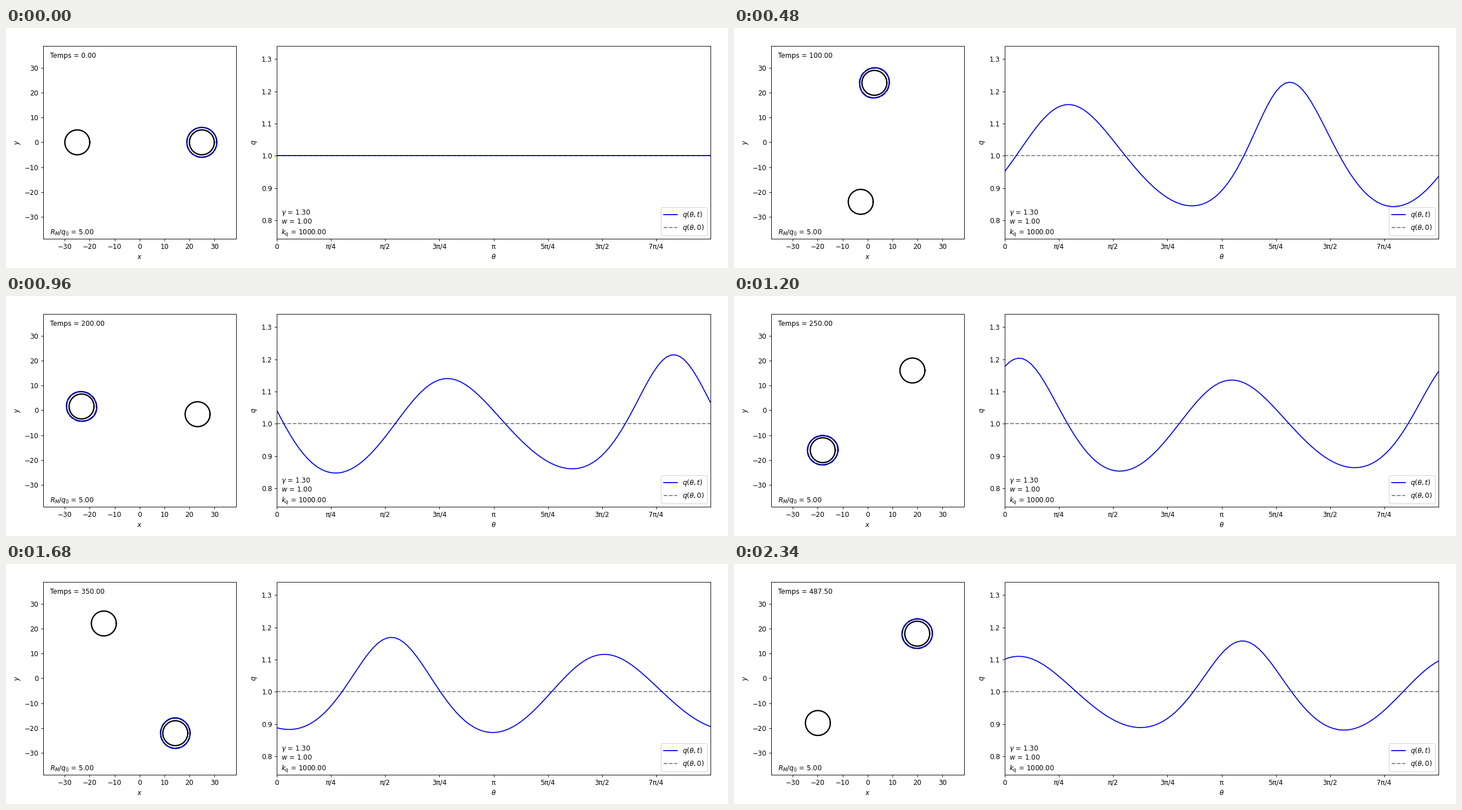
Animation of 1280x427 px, one loop 2400 ms. Source, as a matplotlib script:

```python
import numpy as np
import matplotlib.pyplot as plt
from matplotlib.animation import FuncAnimation

W, H = 1280, 427
DPI = W / 15
FRAMES, INTERVAL, DT = 40, 60, 12.5
SUBSTEPS = 25
R, N = 5, 100
D0 = 25                      # starting distance from the barycentre
SPIN = np.radians(0.825)     # starting angular speed
TIDE, RELAX = 0.0129, 60     # tidal strength and relaxation time


def distance(t):
    """Circular at first, then a radial swing builds up."""
    ramp = 1 - np.exp(-max(t - 65, 0) / 56)
    return D0 - 2.2 * ramp * np.sin(2 * np.pi * t / 580)


def drift(r, angle):
    """Flow along the surface towards the companion."""
    eps = (R + 1) / (2 * r)
    psi = grid - angle - np.pi
    s2 = 1 + eps**2 - 2 * eps * np.cos(psi)
    return -TIDE * (D0 / r)**2 * np.sin(psi) * (s2**-1.5 - 1)


def simulate():
    """State (r, angle, q) at the start of every frame."""
    q, angle, dt = np.ones(N), 0.0, DT / SUBSTEPS
    states = []
    for step in range(FRAMES * SUBSTEPS):
        r = distance(step * dt)
        if step % SUBSTEPS == 0:
            states.append((r, angle, q))
        flux = q * drift(r, angle)
        slope = (np.roll(flux, -1) - np.roll(flux, 1)) * N / (4 * np.pi)
        q = q - dt * (slope + (q - 1) / RELAX)
        angle += dt * SPIN * (D0 / r)**1.8
    return states


def ring(cx, cy, radius):
    return cx + radius * np.cos(theta), cy + radius * np.sin(theta)


def panel(x0, x1, xlim, ylim):
    y0, y1 = 52.45, 394.7
    ax = fig.add_axes([x0 / W, y0 / H, (x1 - x0) / W, (y1 - y0) / H])
    ax.set(xlim=xlim, ylim=ylim)
    return ax


def note(x, y, s):
    """Text with its baseline start given in pixels from the top left."""
    return fig.text(x / W, 1 - y / H, s, va="baseline", zorder=5)


plt.rcParams.update({"font.family": "DejaVu Sans", "font.size": 10})
fig = plt.figure(figsize=(15, H / DPI), dpi=DPI, facecolor="white")
grid = np.arange(N) * 2 * np.pi / N
theta = np.linspace(0, 2 * np.pi, N)
states = simulate()

left = panel(65.9, 407.7, (-38.7, 38.7), (-38.7, 38.7))
ticks = range(-30, 31, 10)
left.set(xticks=ticks, yticks=ticks, xlabel="$x$", ylabel="$y$")
body, = left.plot([], [], "k", lw=2)
twin, = left.plot([], [], "k", lw=2)
shell, = left.plot([], [], "b", lw=2)
rest, = left.plot([], [], "k--", lw=2, alpha=0.5)

right = panel(480.4, 1248.6, (0, 2 * np.pi), (0.743, 1.340))
right.set_xticks(np.arange(8) * np.pi / 4,
                 ["0", "π/4", "π/2", "3π/4", "π", "5π/4", "3π/2", "7π/4"])
right.set_yticks(np.arange(0.8, 1.31, 0.1))
right.set(xlabel=r"$\theta$", ylabel="$q$")
curve, = right.plot([], [], "b", lw=1.5, label=r"$q(\theta, t)$")
right.plot(theta, np.ones(N), "k--", lw=1.5, alpha=0.5, label=r"$q(\theta, 0)$")
right.legend(loc="lower right")

clock = note(77.8, 53, "")
note(77.8, 367, "$R_M/q_0$ = 5.00")
for y, s in [(332, r"$\gamma$ = 1.30"), (348.5, "$w$ = 1.00"),
             (368, "$k_q$ = 1000.00")]:
    note(488.5, y, s)


def update(i):
    r, angle, q = states[i]
    x, y = r * np.cos(angle), r * np.sin(angle)
    body.set_data(*ring(x, y, R))
    twin.set_data(*ring(-x, -y, R))
    shell.set_data(*ring(x, y, R + q))
    rest.set_data(*ring(x, y, R + 1))
    curve.set_data(theta, q)
    clock.set_text(f"Temps = {i * DT:.2f}")
    return body, twin, shell, rest, curve, clock


anim = FuncAnimation(fig, update, frames=FRAMES, interval=INTERVAL,
                     repeat=True, repeat_delay=0, blit=False)
plt.show()
```
